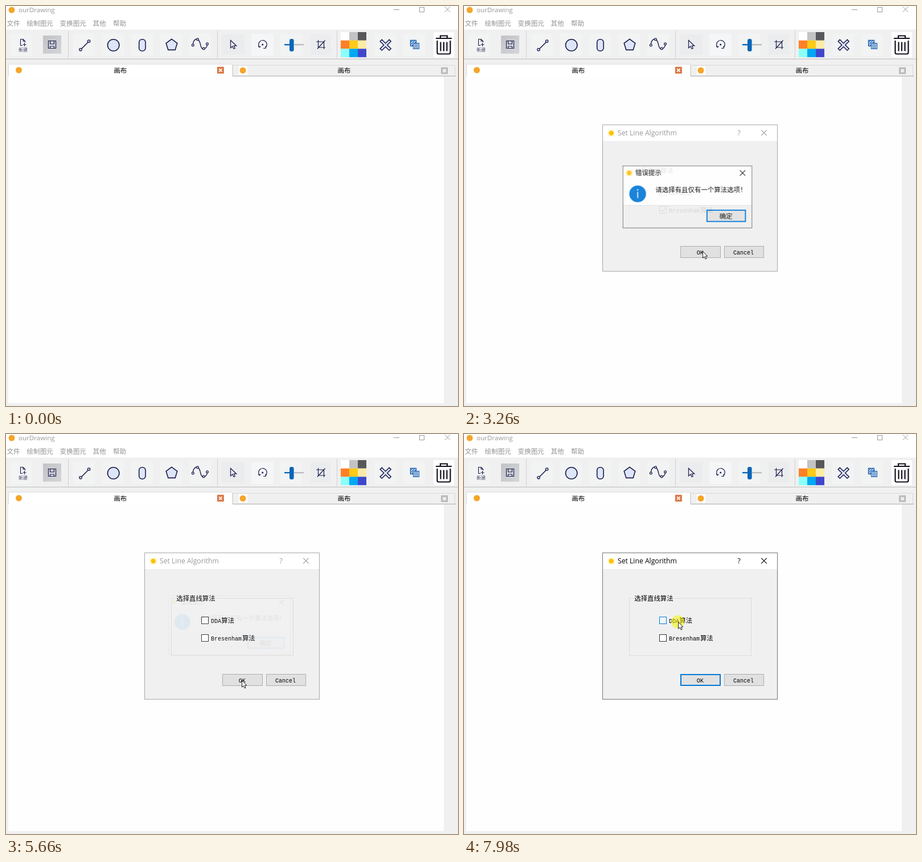
These frames come from a looping animation (794x705 px, 8 s). An HTML page with a canvas:

```html
<!DOCTYPE html>
<html lang="zh-CN">
<head>
<meta charset="utf-8">
<title>ourDrawing</title>
<style>
html, body { margin: 0; width: 100%; height: 100%; overflow: hidden; background: #f0f0f0; }
canvas { display: block; }
</style>
</head>
<body>
<canvas id="stage" width="794" height="705"></canvas>
<script>
const W = 794, H = 705, LOOP = 8000, FADE = 200;
const CJK = '"Noto Sans CJK SC", "Noto Sans CJK", sans-serif';
const UI = '"Open Sans", "Noto Sans CJK SC", sans-serif';
const MONO = '"Liberation Mono", monospace';
const NAVY = '#1b1b4b', BLUE = '#0078d7', PALE = '#dde5f8';

const screen = document.getElementById('stage').getContext('2d');
const buffer = document.createElement('canvas');
buffer.width = W;
buffer.height = H;
const layer = buffer.getContext('2d');
let c = screen;

// [opens, closes]
const dialogs = [[1158, 3740], [4738, 6520], [7150, 9000]];
const alerts = [[3068, 3720], [5640, 6500]];
// [time, x, y] of the pointer tip
const path = [
  [300, 430, 632], [420, 430, 632], [900, 138, 72], [1080, 138, 72],
  [1300, 321, 277], [1315, 321, 277], [1650, 356, 331], [2070, 356, 331],
  [2300, 350, 359], [2480, 350, 359], [2760, 419, 432], [3300, 419, 432],
  [3550, 452, 370], [3800, 452, 370], [4320, 138, 72], [4600, 138, 72],
  [4870, 172, 75], [4900, 172, 75], [5350, 414, 434], [5680, 414, 434],
  [6080, 448, 370], [6540, 448, 370], [6980, 138, 72], [7130, 138, 72],
  [7640, 376, 331], [8000, 376, 331]
];
// [from, to] of each click mark
const clicks = [[960, 1060], [1850, 1960], [2370, 2470], [2930, 3030], [3600, 3700],
  [4520, 4620], [5520, 5620], [6390, 6500], [7040, 7130], [7830, 8000]];

const within = (t, spans) => spans.find(([a, b]) => t >= a && t < b);

function box(x, y, w, h, fill, stroke, lw = 1) {
  if (fill) { c.fillStyle = fill; c.fillRect(x, y, w, h); }
  if (stroke) {
    c.strokeStyle = stroke; c.lineWidth = lw;
    c.strokeRect(x + lw / 2, y + lw / 2, w - lw, h - lw);
  }
}
function shape(d, stroke, lw = 1, fill) {
  const p = new Path2D(d);
  if (fill) { c.fillStyle = fill; c.fill(p); }
  if (stroke) { c.strokeStyle = stroke; c.lineWidth = lw; c.stroke(p); }
}
function disc(x, y, r, fill, stroke, lw = 1) {
  c.beginPath();
  c.arc(x, y, r, 0, 7);
  if (fill) { c.fillStyle = fill; c.fill(); }
  if (stroke) { c.strokeStyle = stroke; c.lineWidth = lw; c.stroke(); }
}
function text(s, x, y, size, color = '#000', family = CJK, align = 'left') {
  c.font = `${size}px ${family}`;
  c.fillStyle = color;
  c.textAlign = align;
  c.fillText(s, x, y);
}
function cross(x, y, r, color, lw = 1) {
  shape(`M${x - r} ${y - r}L${x + r} ${y + r}M${x + r} ${y - r}L${x - r} ${y + r}`, color, lw);
}

function titleBar(active) {
  const ink = active ? '#000' : '#999';
  box(0, 0, W, 41, '#fff');
  disc(10, 7, 5.5, '#f5a52a');
  text('ourDrawing', 22, 11, 11.6, ink, UI);
  box(681, 6, 10, 1, ink);
  box(726, 2, 9, 9, null, ink);
  cross(775.5, 6, 4.7, ink);
  const menu = [['文件', 1.5], ['绘制图元', 36.5], ['变换图元', 94.5], ['其他', 152.5], ['帮助', 188]];
  for (const [s, x] of menu) text(s, x, 35, 11.6, active ? '#000' : '#929292');
}

function toolbar() {
  box(0, 41, W, 53, '#f0f0f0');
  box(0, 41, W, 1, '#f7f7f7');
  box(0, 93, W, 1, '#bdbdbd');
  for (const x of [109, 371, 581]) box(x, 44, 1, 48, '#cfcfcf');
  for (const x of [7, 118, 169, 220, 271, 322, 482, 647, 698]) box(x, 49, 38, 39, '#f2f3f3');
  box(379, 50, 40, 36, '#ebecee');
  box(431, 49, 39, 39, '#f5f6f7');
  box(535, 50, 36, 36, '#ebecee');

  shape('M30 58.5H25.5V69.5H29M30 58.5L33.5 62V64M30 58.5V62H33.5M32.5 65V71M29.5 68H35.5', NAVY, 1.1);
  text('新建', 30, 80, 8, '#44446a', CJK, 'center');

  const g = c.createLinearGradient(65, 52, 97, 84);
  g.addColorStop(0, '#c2c3c7');
  g.addColorStop(1, '#d4d5d8');
  box(65, 52, 32, 32, g);
  shape('M74.5 61.5H87.5V74.5H74.5ZM77.5 61.5V67H84.5V61.5M77.5 74V71H84.5V74', NAVY, 1.2, '#dfe0e6');

  shape('M133 75L144.5 63.5', NAVY, 1.6);
  disc(131, 76.8, 2.2, PALE, NAVY, 1.3);
  disc(145.6, 62, 2.2, PALE, NAVY, 1.3);
  disc(188.7, 69, 10.2, PALE, NAVY, 1.6);
  c.beginPath();
  c.roundRect(233.7, 58.7, 11.4, 20.6, 5.2);
  c.fillStyle = PALE; c.fill();
  c.strokeStyle = NAVY; c.lineWidth = 1.6; c.stroke();
  shape('M291 58.3L300.8 65.6L297.1 77.4H284.9L281.2 65.6Z', NAVY, 1.6, PALE);
  shape('M328.5 67C329 60 335 55 339 61C343 67 341 75 346 75.5C350 76 353.5 72 353.5 68', NAVY, 1.4);
  for (const [x, y] of [[328.3, 69], [336.5, 58.7], [347.3, 75], [353.5, 66.7]]) disc(x, y, 1.9, PALE, NAVY, 1.2);

  shape('M394.5 60.5V74L397.8 71L400 75.5L402.3 74.4L400.2 70.2H404.8Z', NAVY, 1.2);
  shape('M445 72A7.3 7.3 0 1 1 455.5 73.5M452 74.5H456.2V70.5M443.3 70.5L445 73L447.5 71', NAVY, 1.2);
  disc(450.7, 68, 1.5, NAVY);
  box(489, 67, 12, 2.4, '#0a66b8');
  box(506, 67, 17, 2.4, '#b9bcc0');
  c.beginPath();
  c.roundRect(498, 58, 7.6, 22, 3);
  c.fillStyle = '#0a66b8'; c.fill();
  shape('M545 63H558.5V76M548.5 60V73H561M547 75.5L560.5 60.5', NAVY, 1.2);

  ['#ffffff', '#c3c3c3', '#58585a', '#ff7f27', '#ffca18', '#fdeca6', '#8cfffb', '#00a8f3', '#3f48cc']
    .forEach((s, i) => box(588 + i % 3 * 15, 46 + Math.floor(i / 3) * 14.7, 15, 14.8, s));

  shape('M660.2 59.3L666.7 65.8L673.2 59.3L676.2 62.3L669.7 68.8L676.2 75.3L673.2 78.3L666.7 71.8L660.2 78.3L657.2 75.3L663.7 68.8L657.2 62.3Z', NAVY, 1.5, PALE);
  shape('M710.5 60.5H720.5V70.5H710.5ZM711 64L714.5 60.5M711 68L718.5 60.5M713 70L720 63', '#1760b4', 1.3);
  shape('M715.5 65.5H725.5V75.5H715.5ZM718 66V75M720.5 66V75M723 66V75', '#1760b4', 1.2, '#f2f3f3');

  box(751, 46, 36, 44, '#fff');
  shape('M755 57H783M763 56V52.5H775V56M757.5 61V82Q757.5 84.5 760 84.5H778Q780.5 84.5 780.5 82V61M763.5 63.5V79.5M769 63.5V79.5M774.5 63.5V79.5', '#15101f', 2.2);
}

function tabs() {
  box(0, 94, W, H - 94, '#f0f0f0');
  box(4, 124, 765, 576, '#fefefe');
  box(398, 104, 391, 20, '#f0f0f0', '#d9d9d9');
  box(398, 123, 392, 1, '#a9a9a9');
  box(4, 102, 394, 22, '#fff');
  shape('M4.5 124V102.5H397.5V123', '#dcdcdc');
  disc(22.5, 113, 5.5, '#f5a52a');
  box(409, 106, 15, 15, '#fff');
  disc(416, 113.5, 5.5, '#f5a52a');
  text('画布', 200.7, 117.5, 11.5, '#000', CJK, 'center');
  text('画布', 594, 118, 11.5, '#000', CJK, 'center');
  box(371, 107.5, 11.5, 11.5, '#e07b48', '#cf6a38');
  cross(376.8, 113.3, 2.6, '#fff', 1.8);
  box(764.5, 108.5, 11.5, 11, '#c4c4c4', '#a9a9a9');
  cross(770.2, 114, 2.4, '#fff', 1.7);
}

function sun(x, y) {
  box(x - 6, y - 6, 12, 12, '#fff7d6');
  disc(x, y, 4.3, '#fdc208');
}
function button(x, y, w, h, main, hot) {
  if (hot) box(x, y, w, h, '#cfe7f9', '#0063b1');
  else box(x, y, w, h, '#e1e1e1', main ? BLUE : '#adadad', main ? 2 : 1);
}
function checkBox(y, on, hot, pressed) {
  const ink = hot ? BLUE : '#333';
  box(343, y, 13, 13, pressed ? '#cce4f7' : hot ? '#eff7fd' : '#fff', ink);
  if (on > 0) {
    c.globalAlpha = on;
    shape(`M345.7 ${y + 6.5}L348.5 ${y + 9.3}L353.5 ${y + 3.7}`, ink, 1.2);
    c.globalAlpha = 1;
  }
}

function dialog(t, active, px, py) {
  const over = (x, y, w, h) => active && px >= x && px < x + w && py >= y && py < y + h;
  const first = t < 4000;
  const ink = active ? '#000' : '#999';
  box(243, 209, 308, 259, '#f0f0f0', active ? '#757575' : '#a8a8a8');
  box(244, 210, 306, 28, '#fff');
  sun(258.7, 224);
  text('Set Line Algorithm', 270, 228, 12.2, ink, UI);
  text('?', 483, 228, 12.2, ink, UI, 'center');
  cross(527, 223.5, 4.8, ink, 1.1);

  box(290, 289, 215, 102, null, '#dcdcdc');
  box(297, 287, 73, 5, '#f0f0f0');
  text('选择直线算法', 299.3, 293.5, 11.4);
  const ticks = [[322, first ? (t - 1990) / 120 : 0], [353, first ? (t - 2440) / 120 : 0]];
  const names = ['DDA', 'Bresenham'];
  ticks.forEach(([y, on], i) => {
    const hot = over(343, y, 60 + i * 37, 13);
    const pressed = hot && (within(t, clicks) && t < 7800 || t > 1960 && t < 2070);
    checkBox(y, Math.min(1, Math.max(0, on < 1 && on > 0 ? on * .5 : on)), hot, pressed);
    text(names[i], 360, y + 11, 10, '#000', MONO);
    text('算法', 360 + names[i].length * 6.1, y + 11, 11.4);
  });
  const hotOk = over(381, 423, 70, 21);
  button(380, 423, 71, 21, active, hotOk);
  button(457, 423, 70, 21, false, false);
  text('OK', 414.7, 438, 10, '#000', MONO, 'center');
  text('Cancel', 491, 438, 10, '#000', MONO, 'center');
}

function alertBox(hot) {
  box(278, 281, 229, 111, '#fff', '#6e6e6e');
  box(279, 352, 227, 39, '#f0f0f0');
  box(279, 351, 227, 1, '#dfdfdf');
  sun(289.5, 294);
  text('错误提示', 300.5, 298.3, 11.5);
  cross(490, 294, 4.8, '#000', 1.1);
  disc(304.5, 331, 14.8, BLUE);
  box(303.7, 327.5, 1.6, 11, '#fff');
  disc(304.5, 324, 1.2, '#fff');
  text('请选择有且仅有一个算法选项！', 336, 328, 11.5);
  button(426, 359, 70, 22, true, hot);
  text('确定', 460.5, 375, 11.6, '#000', CJK, 'center');
}

// Draws a window fading and growing in around its centre.
function popUp(t, [from], cx, cy, draw) {
  const p = Math.min(1, (t - from) / FADE);
  const s = 1 - .064 * (1 - p);
  layer.clearRect(0, 0, W, H);
  c = layer;
  draw();
  c = screen;
  c.save();
  c.globalAlpha = p;
  c.translate(cx, cy);
  c.scale(s, s);
  c.drawImage(buffer, -cx, -cy);
  c.restore();
}

function pointerAt(t) {
  const i = Math.max(1, path.findIndex(k => k[0] > t));
  const [t0, x0, y0] = path[i - 1], [t1, x1, y1] = path[i];
  const u = Math.max(0, Math.min(1, (t - t0) / (t1 - t0)));
  const e = u * u * (3 - 2 * u);
  return [x0 + (x1 - x0) * e, y0 + (y1 - y0) * e];
}
function pointer(t, x, y) {
  if (within(t, clicks)) disc(x - .5, y, 11.5, 'rgba(244,244,0,.55)');
  c.save();
  c.translate(Math.round(x) + .5, Math.round(y) + .5);
  shape('M0 0V11.8L2.7 9.3L4.7 13.6L6.6 12.7L4.7 8.5H8.4Z', '#222', 1, '#fff');
  c.restore();
}

function step(t) {
  return t < 285 ? 0 : 299 + 77.6 * Math.floor((t - 285) / 77.6);
}

function render(ms) {
  const t = Math.min(7995, step(ms % LOOP));
  const [x, y] = pointerAt(t);
  const dlg = within(t, dialogs), msg = within(t, alerts);
  titleBar(t > 370 && !dlg);
  toolbar();
  tabs();
  if (dlg) popUp(t, dlg, 397, 338.5, () => dialog(t, !msg, x, y));
  if (msg) popUp(t, msg, 392.5, 336.5, () => alertBox(x > 426 && y > 359 && y < 381));
  if (t > 285) pointer(t, x, y);
}

const start = performance.now();
function tick() {
  render(performance.now() - start);
  requestAnimationFrame(tick);
}
tick();
</script>
</body>
</html>
```
